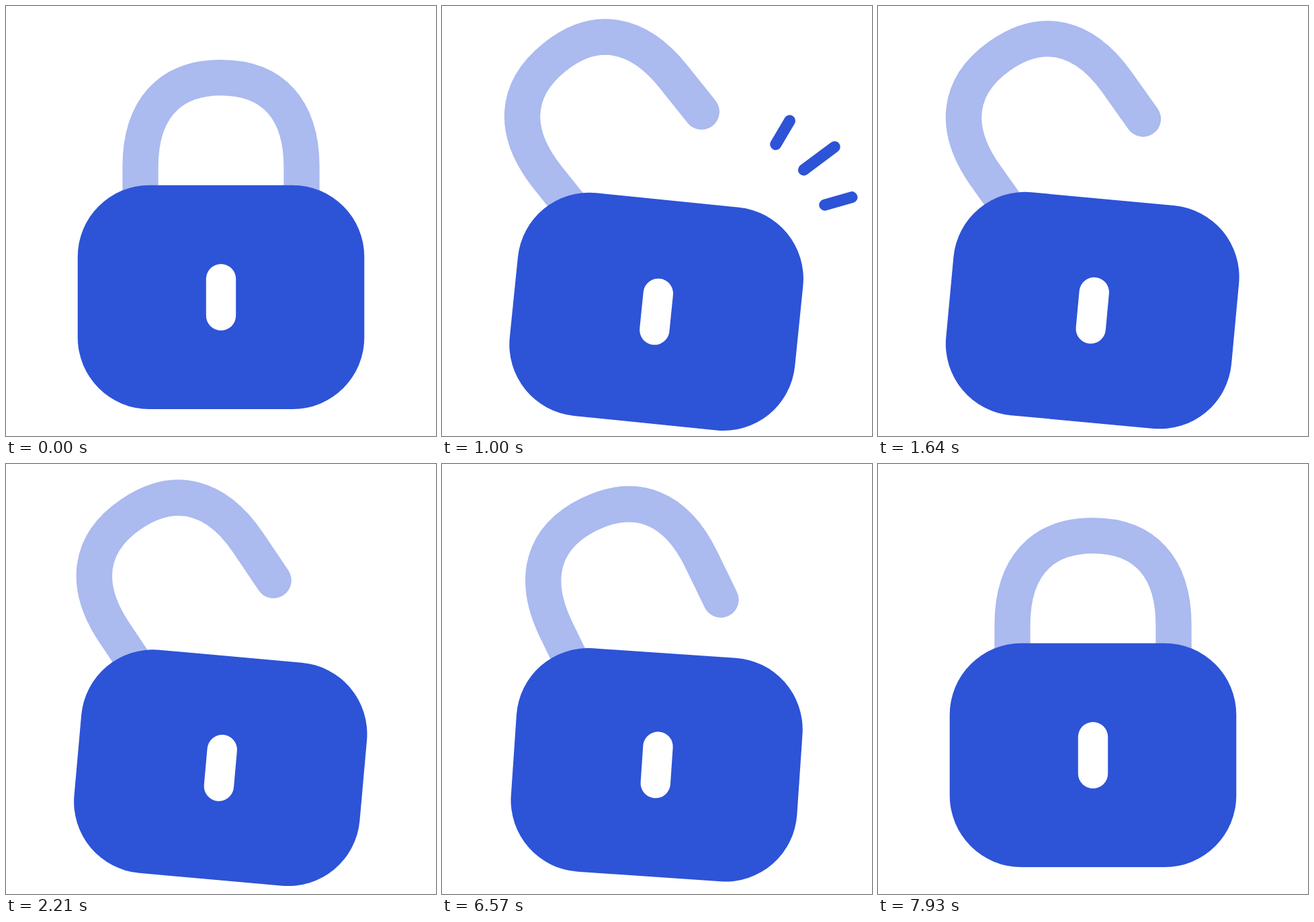
Write an HTML page that moves like this. It is 640 px wide and 640 px high and loops after 8000 ms.

```html
<!DOCTYPE html>
<html lang="en">
<head>
<meta charset="utf-8">
<title>Padlock</title>
<style>
  html, body { margin: 0; width: 100%; height: 100%; overflow: hidden; background: #fff; }
  svg { display: block; width: 100vw; height: 100vh; }
</style>
</head>
<body>
<svg viewBox="0 0 640 640" fill="none" stroke-linecap="round">
  <path id="shackle" d="M200 306.7V240C200 154 242.5 106.7 320 106.7S440 154 440 240V306.7" stroke="#abbaef" stroke-width="53.3"/>
  <g id="body">
    <rect x="106.7" y="266.7" width="426.6" height="333.3" rx="106.7" fill="#2d53d7"/>
    <rect x="297.8" y="384" width="44.4" height="99" rx="22.2" fill="#fff"/>
  </g>
  <g id="sparks" stroke="#2d53d7" stroke-width="17"></g>
</svg>
<script>
const LOOP = 8000, OPEN = 430, CLOSE = 6500;
const SPARK_DELAY = 250, SPARK_TIME = 710;

// Shackle angle while opening: [time, degrees]
const swing = [[OPEN, 0], [915, 40], [1300, 36], [3500, 33]];

// Each spark: inner point, outer point
const rays = [
  [490.1, 217.2, 522.8, 161.7],
  [523.6, 255, 596.1, 200.8],
  [556.7, 299.9, 620.5, 281.6]
];

const byId = id => document.getElementById(id);
const shackle = byId('shackle'), body = byId('body'), sparks = byId('sparks');
const lines = rays.map(() =>
  sparks.appendChild(document.createElementNS('http://www.w3.org/2000/svg', 'line')));

const mix = (a, b, k) => a + (b - a) * k;
const bezier = (p, q, s) => 3 * p * s * (1 - s) ** 2 + 3 * q * s * s * (1 - s) + s ** 3;

// Cubic bezier (.25, .1, .25, 1)
function ease(x) {
  let lo = 0, hi = 1;
  for (let i = 0; i < 24; i++) {
    const mid = (lo + hi) / 2;
    if (bezier(.25, .25, mid) < x) lo = mid; else hi = mid;
  }
  return bezier(.1, 1, lo);
}

function angleAt(t) {
  if (t <= OPEN) return 0;
  if (t >= CLOSE) return 33 * (1 - (t - CLOSE) / (LOOP - CLOSE)) ** 5;
  for (let i = 1; i < swing.length; i++) {
    const [t0, a0] = swing[i - 1], [t1, a1] = swing[i];
    if (t < t1) return mix(a0, a1, ease((t - t0) / (t1 - t0)));
  }
  return 33;
}

function drawSparks(t) {
  const x = (t - (t < CLOSE ? OPEN : CLOSE) - SPARK_DELAY) / SPARK_TIME;
  const visible = x > 0 && x < 1;
  sparks.setAttribute('visibility', visible ? 'visible' : 'hidden');
  if (!visible) return;
  const head = 1 - (1 - x) ** 3, tail = x * x;
  rays.forEach(([x0, y0, x1, y1], i) => {
    const ends = {
      x1: mix(x0, x1, tail), y1: mix(y0, y1, tail),
      x2: mix(x0, x1, head), y2: mix(y0, y1, head)
    };
    for (const key in ends) lines[i].setAttribute(key, ends[key]);
  });
}

const start = performance.now();
function draw() {
  const t = (performance.now() - start) % LOOP;
  const angle = angleAt(t);
  shackle.setAttribute('transform', `rotate(${-angle} 200 308.7)`);
  body.setAttribute('transform', `rotate(${angle * .15} 107 435)`);
  drawSparks(t);
  requestAnimationFrame(draw);
}
draw();
</script>
</body>
</html>
```
